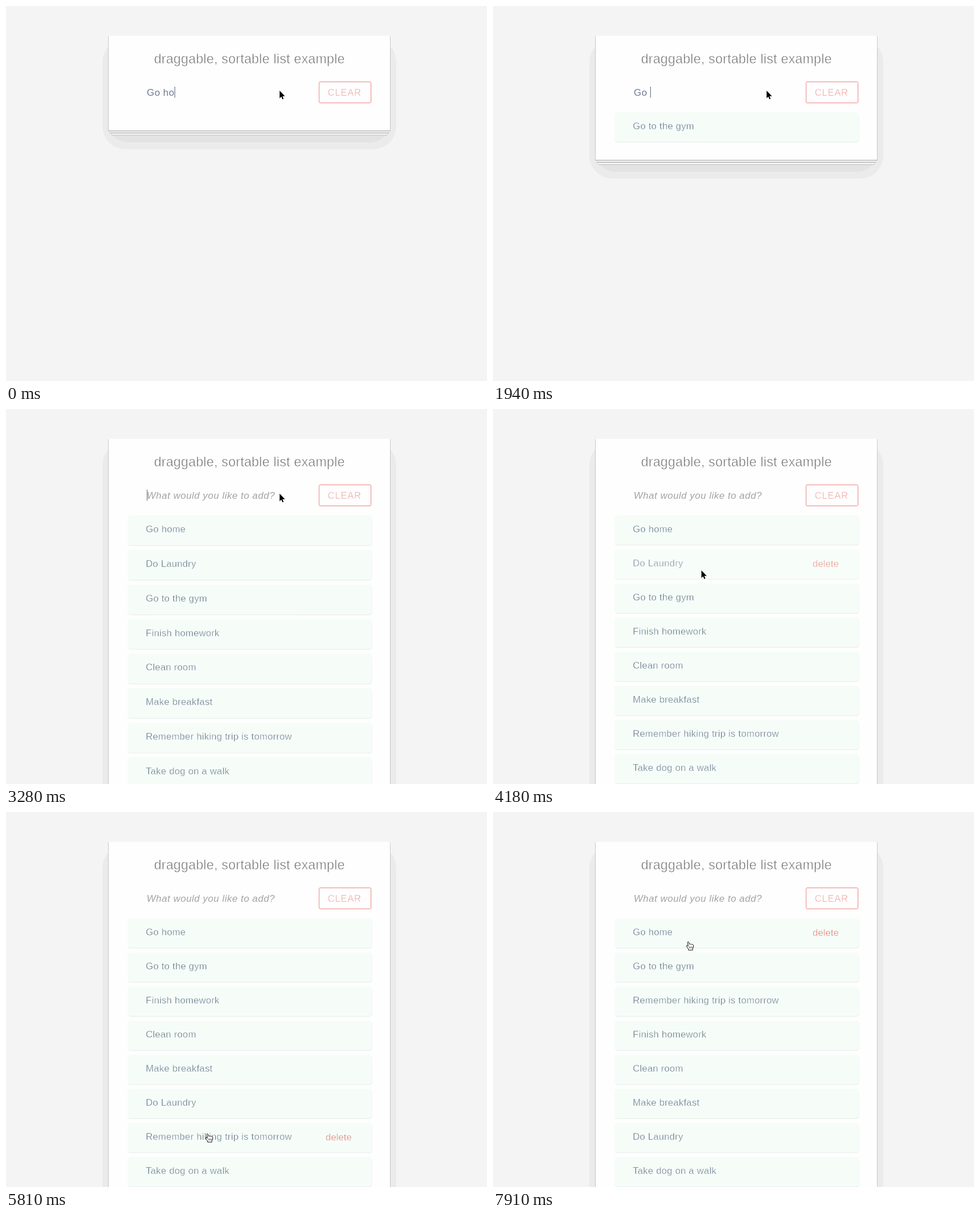
Animation, 848 px wide and 660 px high, one loop 8 s. Source, as an HTML page:

```html
<!DOCTYPE html>
<html lang="en">
<head>
<meta charset="utf-8">
<title>Sortable list</title>
<style>
  html, body { margin: 0; width: 100%; height: 100%; overflow: hidden; background: #f4f4f4; }
  svg { display: block; }
  text { font-family: "Liberation Sans", Arial, sans-serif; white-space: pre; }
  .light { stroke: #fefefe; stroke-width: .4px; }
  .title { font-size: 23.2px; letter-spacing: .28px; fill: #707070; stroke-width: .6px; }
  .input { font-size: 17px; letter-spacing: .5px; fill: #6f7c8f; }
  .hint { font-size: 17px; letter-spacing: .5px; font-style: italic; fill: #a3a3a3; }
  .clear { font-size: 16.6px; letter-spacing: .8px; fill: #e99c99; stroke-width: .5px; }
  .label { font-size: 16.6px; letter-spacing: .3px; fill: #677789; stroke: #f6fdf9; }
  .delete { font-size: 16.6px; letter-spacing: .15px; fill: #e8837c; stroke: #f6fdf9; stroke-width: .3px; }
</style>
</head>
<body>
<svg id="stage" width="848" height="660" viewBox="0 0 848 660">
  <rect width="848" height="660" fill="#f4f4f4"/>
  <g id="paper"></g>
  <text class="light title" x="261" y="101">draggable, sortable list example</text>
  <text class="hint" id="hint" x="248" y="158">What would you like to add?</text>
  <text class="input" id="input" x="248.2" y="158"></text>
  <rect id="caret" y="142" width="1.2" height="19.5" fill="#6f7c8f"/>
  <rect x="552" y="133.5" width="91.5" height="37" rx="2" fill="none" stroke="#e98682"/>
  <text class="light clear" x="567.3" y="158">CLEAR</text>
  <g id="list"></g>
  <g id="cursor">
    <path id="arrow" d="M.4 1V14.5L3.4 11.6 5.4 16.2 7.4 15.3 5.4 10.8H9.7Z" stroke="#fff" stroke-width="1.6" paint-order="stroke"/>
    <g id="hand" fill="#fff" stroke="#111" stroke-linejoin="round">
      <path d="M-4 1.5C-4 0-2 0-1.6 1.5L-.6 5C0 4 1.2 4 1.6 5 2.4 4.2 3.6 4.4 4 5.4 5 4.8 6.4 5.4 6.4 6.8V10L5 12.5V15H-2.5V13L-6 8.6C-6.6 7.2-5 6.4-4 7.4L-2.9 8.4Z"/>
      <path d="M-.4 8.8V12M1.8 8.8V12M4 8.8V12" stroke-width=".8"/>
    </g>
  </g>
</svg>
<script>
const LOOP = 8000, STEP = 149.2;
const TOP = 187, ROW_H = 52, GAP = 8, PITCH = ROW_H + GAP;
const GYM = 'Go to the gym';
const LABELS = ['Go home', 'Do Laundry', GYM, 'Finish homework', 'Clean room',
  'Make breakfast', 'Remember hiking trip is tomorrow', 'Take dog on a walk'];

const MATCH_IN = 1232, MATCH_OUT = 2277, COLLAPSE = 270, ADDED = 2722;

const TYPING = [[0, 'Go ho'], [145, 'Go hom'], [295, 'Go home'], [740, 'Go hom'],
  [890, 'Go ho'], [1040, 'Go h'], [1190, 'Go '], [2380, 'Go h'], [2530, 'Go hom'],
  [2680, 'Go home'], [ADDED, '']];

// time, x, y
const POINTER = [[0, 482, 148], [3600, 482, 148], [3730, 466, 170], [4030, 380, 262],
  [4178, 367, 283], [4327, 368, 312], [4625, 370, 410], [4924, 371, 510], [5222, 371, 545],
  [5510, 368, 545], [5670, 368, 545], [5819, 358, 566], [5968, 345, 592], [6117, 347, 574],
  [6266, 347, 574], [6415, 349, 520], [6714, 352, 357], [6863, 351, 322], [7311, 350, 290],
  [7460, 350, 290], [7908, 347, 228], [LOOP + STEP, 347, 228]];

const DRAGS = [
  { label: 'Do Laundry', start: 4170, end: 5300, x: 367, y: 283, keepsHover: true },
  { label: 'Remember hiking trip is tomorrow', start: 6300, end: 7450, x: 347, y: 574 }
];

const $ = id => document.getElementById(id);
const show = (el, on) => el.setAttribute('display', on ? 'inline' : 'none');
const move = (el, x, y) => el.setAttribute('transform', `translate(${x} ${y})`);

function add(parent, name, attrs = {}, text = '') {
  const el = document.createElementNS('http://www.w3.org/2000/svg', name);
  for (const key in attrs) el.setAttribute(key, attrs[key]);
  el.textContent = text;
  return parent.appendChild(el);
}

// Layers behind and including the card: x, top, bottom offset, radius, colour
const layers = [
  [170, 58, 33, 40, '#ebebeb'], [180, 60, 21, 36, '#e3e3e3'],
  [185.5, 60, 9, 1, '#c6c6c6'], [185.5, 60, 7.8, 1, '#f8f8f8'],
  [183, 60, 5.2, 1, '#b4b4b4'], [183, 60, 3.8, 1, '#f8f8f8'],
  [180.3, 53, 1.5, 1, '#b8b8b8'], [181, 52.5, 0, 1, '#fefefe']
].map(([x, y, drop, rx, fill]) =>
  ({ y, drop, el: add($('paper'), 'rect', { x, y, rx, fill, width: 858 - 2 * x }) }));

const rows = LABELS.map(label => {
  const g = add($('list'), 'g');
  const shade = add(g, 'rect', { x: 214.5, y: 1.2, width: 431, rx: 5, fill: '#e8f0ec' });
  const box = add(g, 'rect', { x: 214, width: 431, rx: 5, fill: '#f6fdf9' });
  add(g, 'text', { class: 'light label', x: 246.5, y: 30 }, label);
  const del = add(g, 'text', { class: 'delete', x: 563.5, y: 31 }, 'delete');
  return { label, g, shade, box, del };
});

// Underdamped spring from 0 to 1, stiffness 120, damping 14
function spring(ms) {
  const t = Math.max(0, ms) / 1000, w = Math.sqrt(71);
  return 1 - Math.exp(-7 * t) * (Math.cos(w * t) + 7 / w * Math.sin(w * t));
}

function pointerAt(t) {
  const i = POINTER.findIndex(p => p[0] > t);
  const [t0, x0, y0] = POINTER[i - 1], [t1, x1, y1] = POINTER[i];
  const k = (t - t0) / (t1 - t0);
  return { x: x0 + (x1 - x0) * k, y: y0 + (y1 - y0) * k };
}

// The dragged row takes a slot once the pointer crosses that slot's middle.
function slotFor(from, y) {
  const middle = r => TOP + ROW_H / 2 + r * PITCH;
  let slot = from;
  while (y > middle(slot + 1)) slot++;
  while (y < middle(slot - 1)) slot--;
  return slot;
}

function arrange(t) {
  const order = LABELS.slice();
  let drag = null;
  for (const d of DRAGS.filter(d => t >= d.start)) {
    const from = order.indexOf(d.label);
    const slot = slotFor(from, pointerAt(Math.min(t, d.end)).y);
    order.splice(from, 1);
    order.splice(slot, 0, d.label);
    if (t < d.end) drag = { ...d, from, slot };
  }
  return { order, drag };
}

function rowHeight(t) {
  if (t >= ADDED) return ROW_H * spring(t - ADDED);
  if (t >= MATCH_OUT + COLLAPSE) return 0;
  if (t >= MATCH_OUT) return ROW_H * Math.max(0, 1 - spring(t - MATCH_OUT));
  return ROW_H * spring(t - MATCH_IN);
}

function drawInput(t) {
  const text = TYPING.filter(k => k[0] <= t).pop()[1];
  $('input').textContent = text;
  show($('hint'), !text);
  show($('caret'), t < DRAGS[0].start);
  $('caret').setAttribute('x', 248.2 + (text ? $('input').getComputedTextLength() : 0));
}

function draw(t) {
  const pointer = pointerAt(t), h = rowHeight(t);
  let { order, drag } = arrange(t);
  if (t < ADDED) order = h > .1 ? [GYM] : [];

  drawInput(t);
  const bottom = 219 + Math.max(0, order.length * (h + GAP) - GAP);
  for (const { el, y, drop } of layers) el.setAttribute('height', bottom + drop - y);

  let hovering = false;
  for (const row of rows) {
    const index = order.indexOf(row.label);
    show(row.g, index >= 0);
    if (index < 0) continue;
    const held = drag && drag.label === row.label;
    const y = TOP + index * (h + GAP);
    const over = !drag && pointer.y >= y && pointer.y <= y + h;
    const stale = drag && drag.keepsHover && drag.slot > drag.from && index === drag.from;
    hovering = hovering || over;
    row.box.setAttribute('height', h);
    row.shade.setAttribute('height', h);
    show(row.del, held || over || stale);
    row.g.setAttribute('opacity', held ? .8 : 1);
    if (held) {
      move(row.g, pointer.x - drag.x, TOP + drag.from * PITCH + pointer.y - drag.y);
      if ($('list').lastChild !== row.g) $('list').append(row.g);
    } else move(row.g, 0, y);
  }

  show($('hand'), hovering);
  show($('arrow'), !hovering);
  move($('cursor'), pointer.x, pointer.y);
}

const begin = performance.now();
function tick() {
  const t = (performance.now() - begin) % LOOP;
  draw(Math.floor((t + 10) / STEP) * STEP);
  requestAnimationFrame(tick);
}
tick();
</script>
</body>
</html>
```
